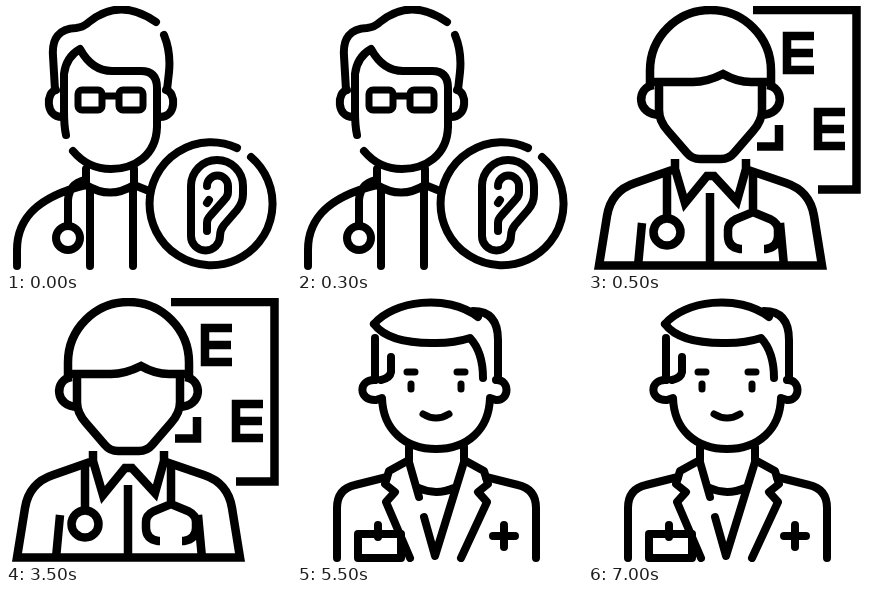
An HTML page that plays this animation: 285x264 px, repeating every 8 s.

```html
<!DOCTYPE html>
<html lang="en">
<head>
<meta charset="utf-8">
<title>Doctor icons</title>
<style>
  html, body { margin: 0; width: 100%; height: 100%; overflow: hidden; background: #fff; }
  svg { display: block; width: 100%; height: 100%; }
  g { fill: none; stroke: #000; stroke-width: 8; stroke-linecap: round; stroke-linejoin: round; }
  .square { stroke-width: 8.5; stroke-linecap: butt; stroke-linejoin: miter; }
  .fine { stroke-width: 7; }
</style>
</head>
<body>
<svg viewBox="0 0 285 264">
  <g class="icon">
    <!-- hair, ears and face -->
    <path d="M49 84L47 50Q45 23 70 22Q78 21 83 16Q114 -9 150 16M158 29Q165 46 163 66L161 84"/>
    <path d="M50 84C40 86 39 111 56 111M160 84C170 86 171 111 154 111"/>
    <path d="M60 129Q58 120 58 105V68Q60 51 74 43Q86 65 106 65H135Q151 65 151 82V121C150 150 128 163 105 163Q82 163 67 145"/>
    <g class="fine">
      <rect x="72" y="84" width="24" height="20" rx="4"/>
      <rect x="113" y="84" width="24" height="20" rx="4"/>
      <path d="M98 90H111"/>
    </g>
    <!-- coat and stethoscope -->
    <path d="M80 163V179Q104 194 128 179V163M84 184V260M127 180V260"/>
    <path d="M11 260V244C11 208 38 189 80 179M128 179L143 185M79 174Q63 178 62 194V219"/>
    <circle cx="62" cy="232" r="12"/>
    <!-- ear badge -->
    <path d="M245 151A61.500 61.500 0 1 1 231 142"/>
    <path d="M185 230V180A26 26 0 0 1 237 180V188Q237 197 231 204L218 219Q214 224 214 230A14.500 14.500 0 0 1 185 230Z"/>
    <path d="M201 180A10.500 10.500 0 0 1 222 180V186Q222 190 219 193L204 210Q201 213 201 217V225M201 197L203 194"/>
  </g>

  <g class="icon square">
    <!-- eye chart -->
    <path d="M165 4H268.500V183.500H230M191 119V140.500H169"/>
    <path id="letter" d="M226 30H199V64H226M199 47H225"/>
    <use href="#letter" x="31" y="76"/>
    <!-- head -->
    <path d="M62 80V64.500A60.500 60.500 0 0 1 183 64.500V80M62 76H105Q119 76 135 68Q149 76 163 76H183"/>
    <path d="M66 79C48 81 48 109 72 109M179 79C197 81 197 109 173 109"/>
    <path d="M71 77V104Q71 115 80 125L99 147Q104 153 112 153H133Q141 153 146 147L165 125Q174 115 174 104V77"/>
    <!-- coat and stethoscope -->
    <path d="M84 164L47 177Q23 185 19 210L11 259.500H234L226 210Q222 185 198 177L160 164"/>
    <path d="M87 153V163L97 197L119 170H126L149 195L158 163V153M122 187V260M54 217L50 260M192 217L196 260"/>
    <path d="M79 167V211M165 168V207M154 243H152Q140 241 140 230V224Q140 217 148 213L165 206L182 213Q190 217 190 224V230Q190 241 178 243H176"/>
    <circle cx="79" cy="226" r="13.500"/>
  </g>

  <g class="icon">
    <!-- hair, ears and face -->
    <path d="M78 40V82M77 26C96 3 150 -5 181 19M176 13Q201 13 201 42V82"/>
    <path d="M77 26Q92 46 139 45Q158 45 173 40Q186 54 186 80M94 59V74Q93 80 84 82"/>
    <path d="M78 82C61 81 61 103 79 102L85 100C86 132 108 151 139 151S192 132 193 100L199 102C213 103 213 81 199 82"/>
    <path class="fine" d="M110 74H118M160 74H168M114 86V91M164 86V91M126 116Q139 124 152 116"/>
    <!-- coat -->
    <path d="M112 149V162L92 173L88 186L98 194L89 204L113 260M167 149V162L187 173L191 186L181 194L190 204L164 260"/>
    <path d="M40 260V210Q40 191 58 187L90 179M239 260V210Q239 191 221 187L189 179"/>
    <path d="M112 164L122 199M127 219L138 258L167 164M122 190Q139 198 157 190"/>
    <path d="M61 236H104V260H61ZM81 227V239M196 238H218M207 227V249"/>
  </g>
</svg>
<script>
  const icons = document.querySelectorAll(".icon");
  const starts = [0, 500, 5500];
  const loop = 8000;
  const origin = performance.now();

  function draw() {
    const time = (performance.now() - origin) % loop;
    const current = starts.findLastIndex(start => time >= start);
    icons.forEach((icon, i) => icon.style.display = i === current ? "" : "none");
    requestAnimationFrame(draw);
  }
  draw();
</script>
</body>
</html>
```
